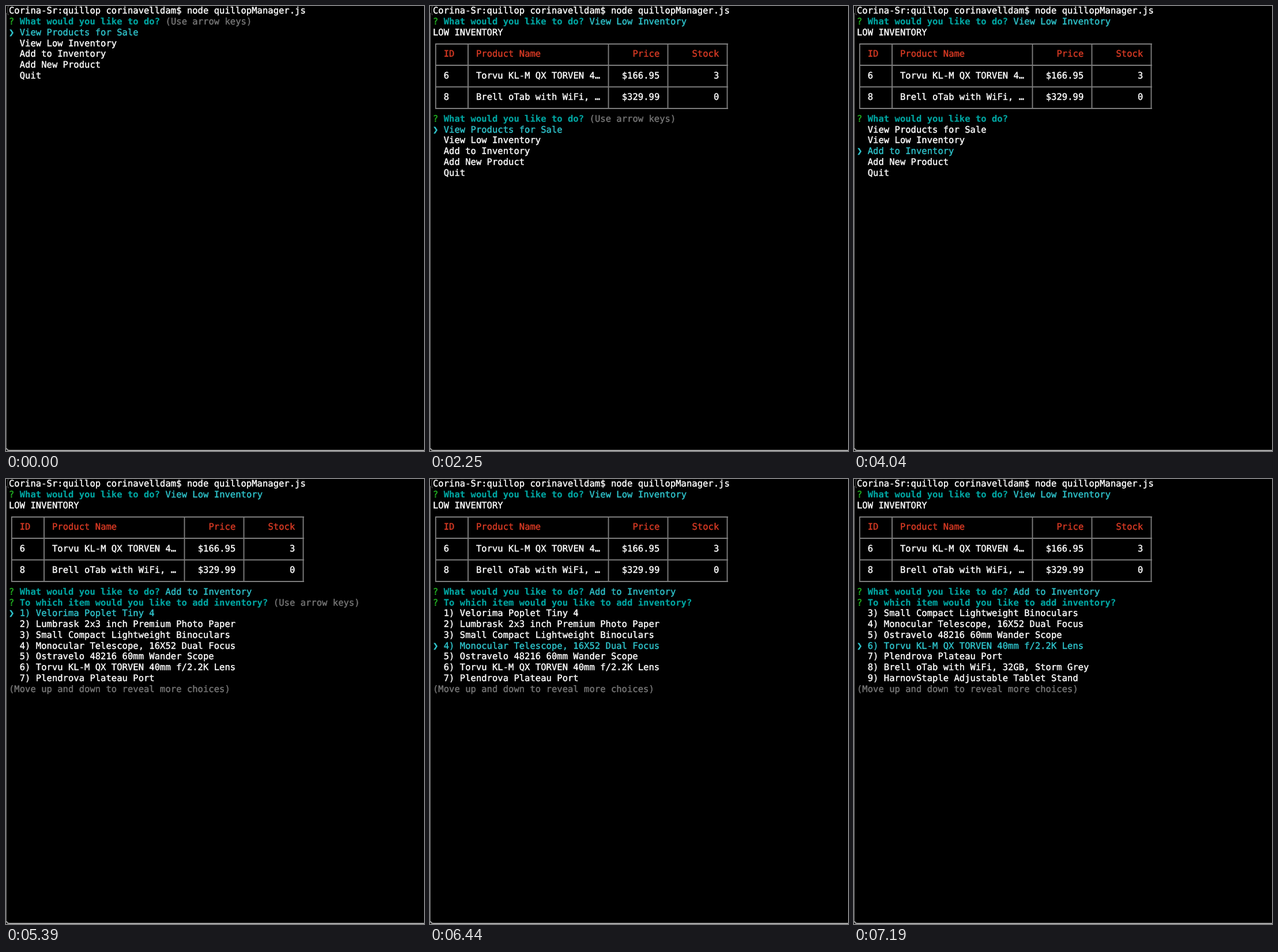
Recreate the animation shown at these times as an HTML page. Size 725 by 773 pixels, loop 8 s.

```html
<!DOCTYPE html>
<html lang="en">
<head>
<meta charset="utf-8">
<title>Store manager terminal</title>
<style>
  html, body { margin: 0; width: 100%; height: 100%; overflow: hidden; background: #000; }
  svg { display: block; width: 725px; height: 773px; }
  text {
    font: 15.55px "DejaVu Sans Mono", monospace;
    text-rendering: geometricPrecision;
    white-space: pre;
    stroke-width: .4px;
  }
  .bold { font-weight: bold; stroke-width: .15px; }
</style>
</head>
<body>
<svg viewBox="0 0 725 773">
  <rect width="725" height="773"/>
  <path d="M.5 12V768" stroke="#777"/>
  <path d="M1 768Q1 772 6 772H725" fill="none" stroke="#a5a5a5" stroke-width="2"/>
  <path d="M5 1H3V15H5" fill="none" stroke="#555"/>
  <g id="screen"></g>
</svg>
<script>
const LOOP = 8000, CELL = 9.364, LINE = 18.75;
const WHITE = '#fff', CYAN = '#2fc4cc', TEAL = '#00a6a2', GREEN = '#22b322', RED = '#d83a24', GREY = '#767676';

const menu = ['View Products for Sale', 'View Low Inventory', 'Add to Inventory', 'Add New Product', 'Quit'];
const products = [
  'Velorima Poplet Tiny 4',
  'Lumbrask 2x3 inch Premium Photo Paper',
  'Small Compact Lightweight Binoculars',
  'Monocular Telescope, 16X52 Dual Focus',
  'Ostravelo 48216 60mm Wander Scope',
  'Torvu KL-M QX TORVEN 40mm f/2.2K Lens',
  'Plendrova Plateau Port',
  'Brell oTab with WiFi, 32GB, Storm Grey',
  'HarnovStaple Adjustable Tablet Stand'
].map((name, i) => `${i + 1}) ${name}`);

// Each step: start time, screen, selected entry, first visible product
const steps = [
  [0, 'start', 0],
  [1500, 'start', 1],
  [2250, 'stock', 0],
  [3600, 'stock', 1],
  [4040, 'stock', 2],
  [5390, 'items', 0, 0],
  [6140, 'items', 1, 0],
  [6290, 'items', 2, 0],
  [6440, 'items', 3, 0],
  [6740, 'items', 4, 1],
  [7190, 'items', 5, 2]
];

const put = (row, col, text, color = WHITE, cls = '') =>
  `<text x="${5 + col * CELL}" y="${13.3 + row * LINE}" fill="${color}" stroke="${color}" class="${cls}">${text}</text>`;

const ask = (row, question, reply, color) =>
  put(row, 0, '?', GREEN) + put(row, 2, question, TEAL, 'bold') +
  put(row, question.length + 3, reply, color);

const list = (row, entries, selected) => entries.map((entry, i) =>
  i === selected
    ? put(row + i, 0, '❯', CYAN) + put(row + i, 2, entry, CYAN)
    : put(row + i, 2, entry)).join('');

const prompt = (row, question, entries, selected, hint) =>
  ask(row, question, hint ? '(Use arrow keys)' : '', GREY) + list(row + 1, entries, selected);

function tableRow(row, [id, name, price, stock], color) {
  const right = (end, text) => put(row, end - text.length, text, color);
  return put(row, 2, id, color) + put(row, 8, name, color) + right(42, price) + right(53, stock);
}

function table() {
  const across = [66, 103, 140.5, 178].map(y => `M9 ${y}H517`).join('');
  const down = [0, 6, 32, 43, 54].map(col => `M${5.2 + (col + .5) * CELL} 66V178`).join('');
  const cut = product => product.slice(3, 25) + '…';
  return `<path d="${across}${down}" fill="none" stroke="#7c7c7c" stroke-width="1.9"/>` +
    tableRow(4, ['ID', 'Product Name', 'Price', 'Stock'], RED) +
    tableRow(6, ['6', cut(products[5]), '$166.95', '3']) +
    tableRow(8, ['8', cut(products[7]), '$329.99', '0']);
}

function render([, screen, selected, first]) {
  const question = 'What would you like to do?';
  const hint = selected === 0;
  const command = put(0, 0, 'Corina-Sr:quillop corinavelldam$ node quillopManager.js');
  if (screen === 'start') return command + prompt(1, question, menu, selected, hint);

  const report = command + ask(1, question, menu[1], CYAN) + put(2, 0, 'LOW INVENTORY') + table();
  if (screen === 'stock') return report + prompt(10, question, menu, selected, hint);

  return report + ask(10, question, menu[2], CYAN) +
    prompt(11, 'To which item would you like to add inventory?',
      products.slice(first, first + 7), selected - first, hint) +
    put(19, 0, '(Move up and down to reveal more choices)', GREY);
}

const view = document.getElementById('screen');
const start = performance.now();
let shown;

function tick() {
  const time = (performance.now() - start) % LOOP;
  const step = steps.findLast(([from]) => from <= time);
  if (step !== shown) {
    view.innerHTML = render(step);
    shown = step;
  }
  requestAnimationFrame(tick);
}
tick();
</script>
</body>
</html>
```
